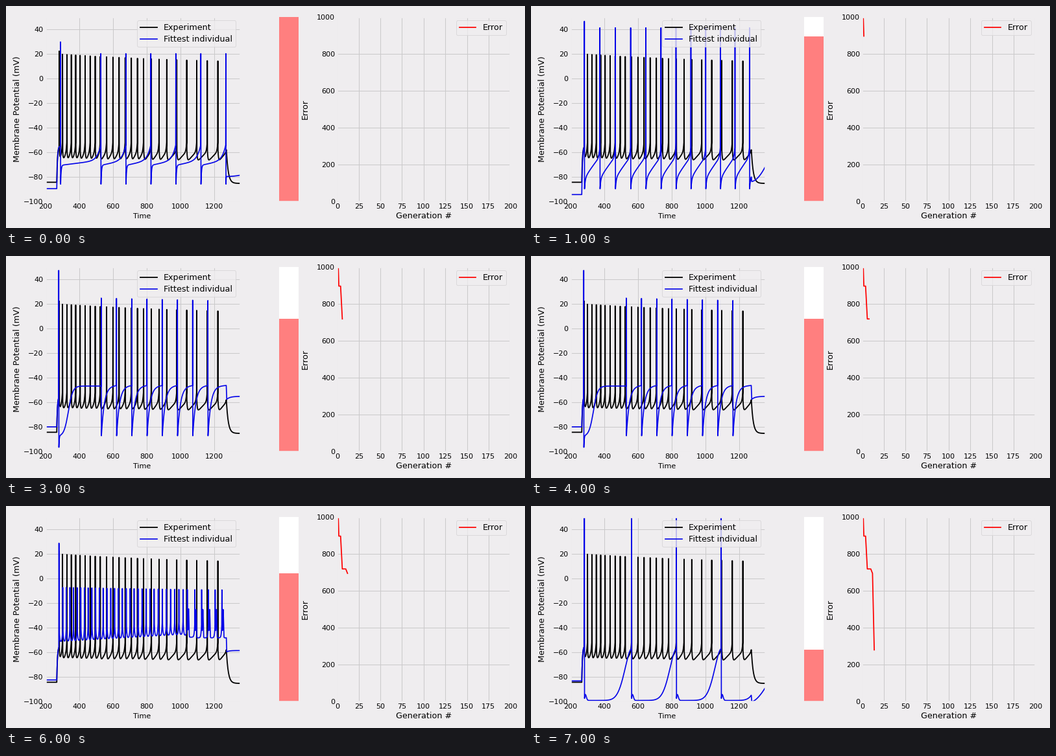
A matplotlib script that plays this animation: 800x343 px, repeating every 8 s.

```python
import numpy as np
import matplotlib.pyplot as plt
from matplotlib.animation import FuncAnimation

W, H, DPI = 800, 343, 100
BG, GRID = "#efedef", "#cbcacb"
LABEL, SMALL = 9.2, 8.0
STIM_START, STIM_END, T_END = 268, 1270, 1350

plt.rcParams.update({
    "font.family": "DejaVu Sans",
    "font.size": LABEL,
    "axes.facecolor": BG,
    "axes.edgecolor": BG,
    "axes.linewidth": 1.9,
    "axes.axisbelow": True,
    "grid.color": GRID,
    "grid.linewidth": 0.75,
    "xtick.labelsize": SMALL,
    "ytick.labelsize": SMALL,
})


def decay(x, tau):
    return np.exp(-x / tau)


def neuron(rest, times, first, peaks, cycle, last, tail):
    """Rest, charging, spikes with cycle(d, T, t0) between them, then tail(d)."""
    t = np.linspace(STIM_START, times[0] - 0.8, 30)
    ts = [[200], t]
    vs = [[rest], rest + (-55 - rest) * (1 - decay(t - STIM_START, 4))]
    tops = np.append(first, np.linspace(*peaks, len(times) - 1))
    for t0, T, top in zip(times, np.append(np.diff(times), last), tops):
        d = np.linspace(0.8, T - 0.8, 120)
        d = d[t0 + d < STIM_END]
        ts += [[t0], t0 + d]
        vs += [[top], cycle(d, T, t0)]
    d = np.linspace(2.5, T_END - STIM_END, 60)
    return np.concatenate(ts + [STIM_END + d]), np.concatenate(vs + [tail(d)])


def experiment():
    def cycle(d, T, t0):
        return -68.3 + 12 * decay(d, 3) + 9 * d / T + 9 * decay(T - d, 3.5)

    # Intervals grow as the cell adapts
    times = np.interp(range(24), [0, 4, 8, 10, 15, 18, 21, 23],
                      [302, 406, 525, 600, 781, 918, 1095, 1220])
    return neuron(-84.6, np.append(282.4, times), 22, (19.5, 14), cycle, 55,
                  lambda d: -85.5 + 27.5 * decay(d, 11))


def slow_firing():
    def cycle(d, T, t0):
        return -70.8 - 20 * decay(d, 3) + 4 * d / T + 13 * decay(T - d, 20)

    times = np.append(290, np.linspace(528.5, 1267, 6))
    return neuron(-89.8, times, 29.5, (20, 20), cycle, 147,
                  lambda d: -79.9 + (d / 80) ** 2)


def ramp_firing():
    def cycle(d, T, t0):
        return (-83 - 9 * decay(d, 4) + 19 * (d / T) ** 0.8
                + 9 * decay(T - d, 5))

    k = np.arange(12)
    return neuron(-94.6, 283.6 + 92 * k - 0.3 * k ** 2, 46.3, (41, 41), cycle, 90,
                  lambda d: -84 + 11.5 * (d / 80) ** 1.8)


def plateau_firing():
    def cycle(d, T, t0):
        if T > 200:
            return -47 - 41 / (1 + np.exp((d - 57) / 13)) - 14 * decay(d, 2)
        return -47.4 - 42 * decay(d, 17) + d / T

    times = np.append(279.7, 531 + 90 * np.arange(8))
    return neuron(-80.2, times, 47, (24.5, 22.5), cycle, 115,
                  lambda d: -55.4 - 2.7 * decay(d, 20))


def fast_firing():
    def cycle(d, T, t0):
        base = np.interp(t0, [300, 1000, 1050], [-52, -46, -48.5])
        bump = 22 * np.exp(-((d - 7.5) / 2.5) ** 2) * (T > 30)
        return base + bump + 14 * decay(d, 3) + 14 * decay(T - d, 3)

    k = np.arange(33)
    times = np.concatenate([[281], 303.5 + 21 * k + k ** 2 / 16,
                            1084 + 40 * np.arange(5)])
    return neuron(-82.7, times, 28.5, (-7.5, -9.5), cycle, 40,
                  lambda d: -58.8 - 1.2 * decay(d, 15))


def deep_firing():
    def cycle(d, T, t0):
        bump = 5 * np.exp(-((d - 5) / 9) ** 2) - 4 * decay(d, 1.5)
        return -99.4 + bump + 42 * np.exp(-((T - d) / 57) ** 1.8)

    return neuron(-83.5, [283.6, 562, 827, 1092], 75, (75, 75), cycle, 268,
                  lambda d: -100.5 + 11 * (d / 80) ** 1.6)


def add_axes(x0, x1, y0=16.6, y1=301.6):
    ax = fig.add_axes([x0 / W, 1 - y1 / H, (x1 - x0) / W, (y1 - y0) / H])
    ax.tick_params(length=0, pad=2.3)
    return ax


def label(x, y, text, size=LABEL, rotation=0):
    fig.text(x / W, 1 - y / H, text, size=size, rotation=rotation,
             ha="center", va="baseline", rotation_mode="anchor")


def add_legend(ax):
    leg = ax.legend(loc="upper right", bbox_to_anchor=(1, 1.003),
                    labelspacing=0.4, framealpha=0.8, facecolor=BG,
                    edgecolor="#d6d4d6")
    leg.get_frame().set_linewidth(0.7)


fig = plt.figure(figsize=(W / DPI, H / DPI), dpi=DPI, facecolor=BG)

# Voltage traces
volt = add_axes(60.5, 360.5)
volt.set(xlim=(200, T_END), ylim=(-100, 50), xticks=range(200, 1201, 200),
         yticks=range(-100, 41, 20))
volt.grid(True)
volt.plot(*experiment(), color="black", lw=1.3, label="Experiment")
fit_line, = volt.plot([], [], color="#0202e8", lw=1.2,
                      label="Fittest individual")
add_legend(volt)
label(21.3, 159, "Membrane Potential (mV)", rotation=90)
label(210, 327.5, "Time", SMALL)

# Error bar
gauge = add_axes(420.5, 451)
gauge.set(xlim=(0, 1), ylim=(0, 1000), xticks=[], yticks=[], facecolor="white")
gauge.spines[["left", "right", "top"]].set_visible(False)
level = gauge.bar(0.5, 1000, width=1, color="#ff7f7f")[0]

# Error history
hist = add_axes(510.4, 777.2)
hist.set(xlim=(0, 200), ylim=(0, 1000), xticks=range(0, 201, 25),
         yticks=range(0, 1001, 200))
hist.grid(True)
err_line, = hist.plot([], [], color="red", lw=1.25, label="Error")
add_legend(hist)
label(465.2, 159.5, "Error", rotation=90)
label(643.8, 328, "Generation #")

slow, ramp, plateau = slow_firing(), ramp_firing(), plateau_firing()
best = [slow, ramp, ramp, plateau, plateau, plateau, fast_firing(), deep_firing()]
errors = [1200, 895, 895, 717, 717, 717, 693, 278]
generations = 2 * np.arange(len(errors))


def update(i):
    fit_line.set_data(*best[i])
    err_line.set_data(generations[:i + 1], errors[:i + 1])
    level.set_height(min(errors[i], 1000))
    return fit_line, err_line, level


anim = FuncAnimation(fig, update, frames=len(errors), interval=1000,
                     repeat=True, repeat_delay=0)
plt.show()
```
